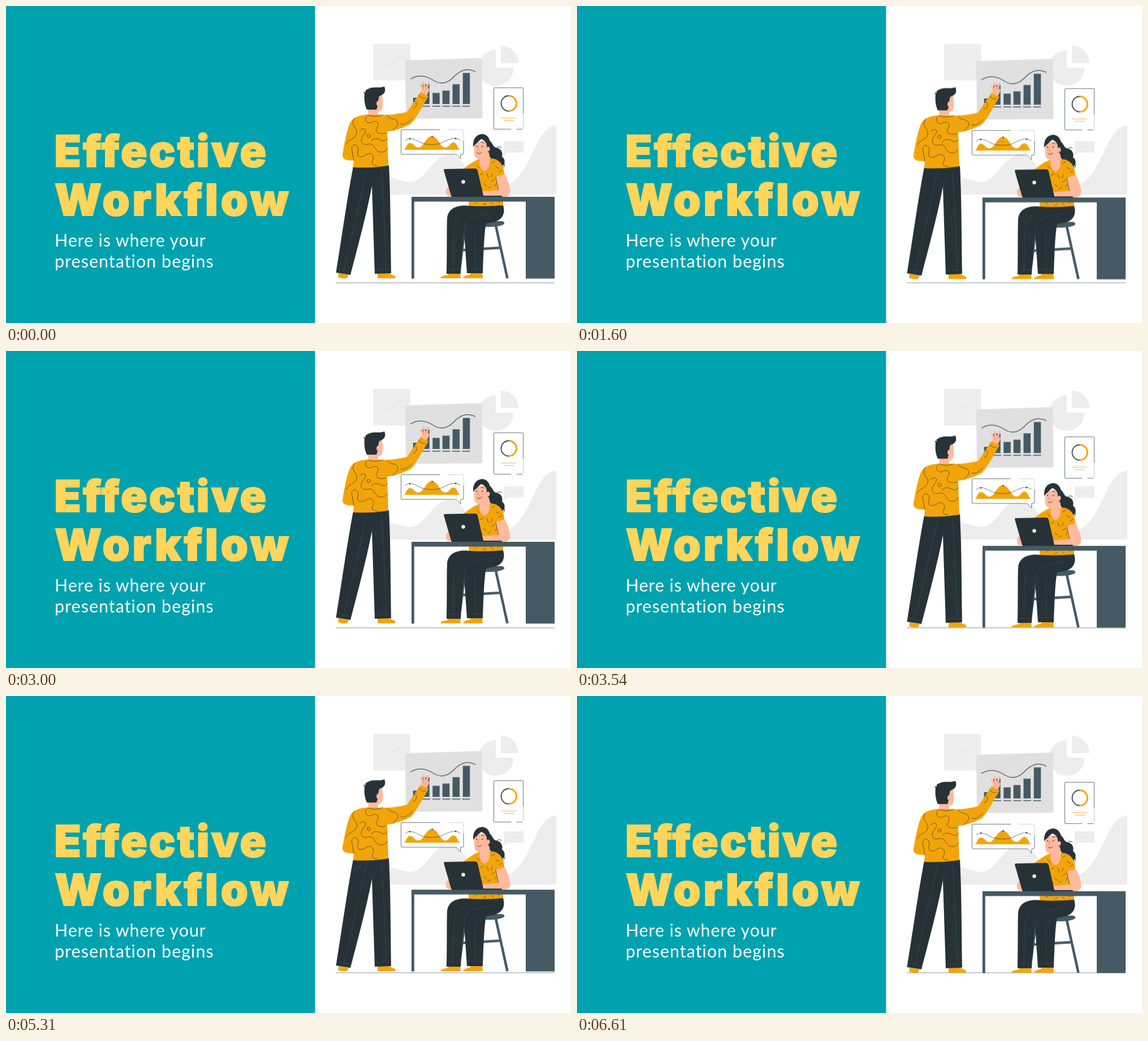
Write an HTML page without scripts that moves like this. It is 999x560 px and loops after 6690 ms.

```html
<!DOCTYPE html>
<html lang="en">
<head>
<meta charset="utf-8">
<title>Effective Workflow</title>
<style>
  html, body { margin: 0; width: 100%; height: 100%; overflow: hidden; background: #fff; }
  svg { display: block; width: 100vw; height: 100vh; }
  .title { font: 900 77px Inter, sans-serif; fill: #ffd55c; stroke: #ffd55c; stroke-width: 2; }
  .sub { font: 400 30.5px Lato, sans-serif; fill: #fff; }
  .pale { fill: #ededed; }
  .dark { fill: #263238; }
  .slate { fill: #455a64; }
  .gold { fill: #f2a50a; }
  .skin { fill: #ffb99c; }
  .line { fill: none; stroke: #263238; stroke-linecap: round; stroke-linejoin: round; }
  .thin { stroke-width: .9; opacity: .75; }
  .beam { fill: none; stroke: #455a64; }
  .crease { fill: none; stroke: #3f4d55; stroke-width: .7; }

  .float { animation: float 6.69s linear infinite; }
  @keyframes float {
    0% { transform: translateY(0); }
    8.97%, 31.39%, 53.81%, 76.23%, 98.65% { transform: translateY(8px); }
    20.18%, 42.6%, 65.02%, 87.44% { transform: translateY(-2px); }
    100% { transform: translateY(6.8px); }
  }
</style>
</head>
<body>
<svg viewBox="0 0 999 560" preserveAspectRatio="none">
  <rect width="999" height="560" fill="#fff"/>
  <rect width="546.5" height="560" fill="#00a2af"/>
  <text class="title" x="85.5" y="284" letter-spacing="3.3">Effective</text>
  <text class="title" x="86" y="370" letter-spacing="4.900">Workflow</text>
  <text class="sub" x="86" y="424.500" letter-spacing=".85">Here is where your</text>
  <text class="sub" x="86" y="461.500" letter-spacing="1">presentation begins</text>

  <!-- still backdrop -->
  <g class="pale">
    <path d="M679 303C698 306 712 316 728 307C748 294 758 263 785 263C812 263 815 305 845 317C930 345 925 214 973 211V333H679Z"/>
    <rect x="649" y="67" width="65.500" height="64.500" rx="2"/>
    <path d="M866 109V78A31.500 31.500 0 1 0 897.500 109Z"/>
    <path d="M875 101V70A31 31 0 0 1 906 101Z"/>
    <path d="M881 239H914Q915 239 915 240V258Q915 259 914 259H887L880 264V240Q880 239 881 239Z"/>
  </g>
  <path d="M665 112L675 102L679 106L686 96L690 98L700 83" fill="none" stroke="#dfdfdf"/>
  <path d="M889 249.500h2m5 0h2m5 0h2" stroke="#d9d9d9" stroke-width="2"/>
  <path d="M583 489H970" stroke="#8d9599"/>

  <g class="float">
    <!-- bar chart board -->
    <path d="M708 96L839 92Q841 92 841.500 94L842.500 196Q842.500 198 840 198.500L709 199Q707 199 707 197L706 98Q706 96 708 96Z" fill="#e0e0e0"/>
    <path class="beam" stroke-width="12.500" d="M726 173V162M742.500 173V138.500M760.500 173V153.500M778 173V149.500M795.800 173V138.300M814 173V118.300"/>
    <path class="beam" stroke-width="1.600" d="M719 177h14m3 0h14m4 0h14m3.500 0h14m3.500 0h14m3.500 0h14"/>
    <path class="beam" stroke-width="1.300" d="M715 129C733 119 746 125 757 132C769 139 780 137 791 126C804 112 816 109 830 116"/>

    <!-- ring card -->
    <rect x="862.500" y="144.500" width="52" height="73" rx="2" fill="#fff"/>
    <path class="line thin" d="M893 217.500H864Q862.500 217.500 862.500 216V146Q862.500 144.500 864 144.500H913Q914.500 144.500 914.500 146V190M903 217.500H913"/>
    <path d="M914.500 190V216" stroke="#c4c8ca"/>
    <path d="M889 158.500A13.500 13.500 0 0 0 889 185.500" fill="none" stroke="#37474f" stroke-width="1.800"/>
    <path d="M889 158.500A13.500 13.500 0 0 1 889 185.500" fill="none" stroke="#f2a50a" stroke-width="3"/>
    <path d="M875 198H902M880 202.500H898" stroke="#f4b63e" stroke-width="1.200"/>

    <!-- wave card -->
    <path d="M700 218.500H807Q809 218.500 809 221V260Q809 262 807 262H804L803.500 270L796 262H700Q698.500 262 698.500 260V220Q698.500 218.500 700 218.500Z" fill="#fff"/>
    <path class="line thin" d="M767 218.500H700Q698.500 218.500 698.500 220V260Q698.500 262 700 262H796L803.500 270L804 262H807Q809 262 809 260V238"/>
    <path d="M781 218.500H807Q809 218.500 809 221V238" fill="none" stroke="#cfd2d4"/>
    <path class="gold" d="M703 254C707 254 708 242 714 242C721 242 722 250 729 250C739 250 742 230 753 230C764 230 767 250 777 250C784 250 785 241 791 241C798 241 799 254 803 254Z"/>
    <path class="line thin" d="M706 238C713 230 723 236 733 241C743 246 762 246 772 241C784 235 794 230 803 237"/>
    <path class="line" stroke-width="2.400" d="M714 234.500h.1M753.500 230.500h.1M795 234h.1"/>

    <!-- standing man -->
    <path class="gold" d="M588 472L606 475L603 481Q594 482 587 479ZM657 471H675L688 477Q690 481 686 481H657Z"/>
    <path class="dark" d="M614 283L677 281C680 330 680 410 681 472L652 473L647 318C637 370 622 425 609 475L583.500 471C592 420 603 340 614 283Z"/>
    <path class="crease" d="M638 289C624 350 610 415 597 469M664 288C668 350 671 410 672 468M647 318Q648 307 656 302M618 296Q625 300 629 292M585 464L610 469M652 466L680 465"/>
    <path class="skin" d="M640 178H658V191Q654 198 641 193ZM655 158H665C667 168 667 178 664 183Q660 187 653 186Z"/>
    <path class="dark" d="M632 151L636 153Q634 149 639 147C649 141 659 146 669 142C673 151 668 157 660 159C658 164 658 171 657 177L655 183H638C634 175 633 164 634 155Z"/>
    <ellipse class="skin" cx="658.500" cy="172" rx="3.500" ry="4.500"/>
    <path class="skin" d="M733 154L735 147L732 140Q732 137 734 138L738 144L737 134Q738 131 740 134L742 143L746 134Q748 132 748.500 135L746 144Q750 146 748 150L743 160Z"/>
    <path d="M738 144L739 149M742 145Q746 144 748 147" fill="none" stroke="#d98468" stroke-width=".7"/>
    <path class="gold" d="M639 192C625 192 614 197 609 205C602 220 598 245 595 262C594 270 600 273 615 273L614 285Q645 287 676 282L674 222C690 220 708 213 716 208C722 203 735 180 747 159L733 152L709 187C695 190 680 193 667 192Z"/>
    <g class="line thin">
      <path d="M617 198C605 211 626 216 619 228C614 237 605 235 602 244"/>
      <path d="M638 194C631 204 641 209 648 205C656 201 661 207 656 215C651 223 660 228 672 224"/>
      <path d="M625 220C636 212 639 220 632 228C624 238 629 247 640 244C654 241 650 257 662 258C668 259 672 255 674 252"/>
      <path d="M615 273L611 250C616 239 626 248 622 258C619 267 630 268 636 263C646 256 653 266 648 274C646 279 650 283 656 282"/>
      <path d="M646 239C649 232 658 234 664 237C670 240 673 237 674 234"/>
      <path d="M674 193C679 202 688 197 692 204C696 211 687 215 684 220M698 208C704 212 713 204 718 199M720 181C727 178 728 171 723 168M730 157Q733 164 741 163"/>
      <circle cx="641" cy="229.500" r="3"/>
      <path d="M639 192Q652 198 666 192"/>
    </g>

    <!-- stool -->
    <path class="slate" d="M815 380H877Q882 381 881 385Q873 391 848 390Q820 389 815 385Z"/>
    <path class="beam" stroke-width="4.500" d="M866 388L886.500 481M812 386L803 458"/>
    <path class="beam" stroke-width="4.500" d="M808 431L875 427"/>

    <!-- seated woman -->
    <path class="dark" d="M852 236C861 240 860 248 866 250C876 252 879 259 877 266C885 272 882 283 874 285C867 286 862 281 861 274C853 266 848 250 852 236Z"/>
    <path class="line" d="M871 283Q881 290 882 279M866 253Q870 246 876 250"/>
    <path class="gold" d="M837 270C826 274 817 281 806 290L813 336H818V355H879V336L872 305L881 298C881 285 876 276 868 272C863 269 857 269 852 269Z"/>
    <path class="skin" d="M829 240C827 248 827 258 829 265Q832 271 838 270L837 276Q839 290 847 291Q856 287 855 270L855 238Z"/>
    <path class="dark" d="M826 249C825 235 831 227 842 226C852 227 857 235 856 247L855 262Q850 256 850 247C850 240 844 236 840 235C835 240 831 242 826 249Z"/>
    <ellipse class="skin" cx="852.500" cy="252.500" rx="3" ry="4"/>
    <circle cx="853" cy="259" r="1.200" class="gold"/>
    <g class="line">
      <path stroke-width=".9" d="M830 243L833 242M840 240L845 242M833 259Q837 263 841 258"/>
      <path stroke-width="2" d="M832 248h.1M842 248h.1"/>
    </g>
    <path d="M836 247L834 254H837" fill="none" stroke="#d47c62" stroke-width=".7"/>
    <path class="skin" d="M866 302L882 297C888 310 893 323 891 330C889 337 882 338 873 337L835 336Q831 332 838 328L871 325ZM787 324Q781 316 778 325Q777 333 782 336H791Z"/>
    <g class="line thin">
      <path d="M832 281l5 5M858 277l6-3M866 284l6 3M850 296l3 7M838 298l6-3M860 296l-2 6M872 293l5-3M845 314l5 4M858 310l6-4M864 318l3-4M842 323l-3-5M852 322l5-3M825 288l3 5M829 349l4-4M844 351l5-2M858 347l4 4M870 347l3-2"/>
      <path d="M866 302Q868 314 871 325"/>
    </g>
    <path class="dark" d="M776 288L829 287Q833 287 834 291L844 335Q844 337 842 338H791Q788 338 787 335L774 290Q774 288 776 288Z"/>
    <path class="dark" d="M790 335H875Q878 335 877 339H790Z"/>
    <circle cx="808.500" cy="310.500" r="3.200" fill="#fff"/>

    <path class="gold" d="M782 472H803L804 481H768Q768 477 782 475ZM821 471H842L843 481H808Q808 477 821 474Z"/>
    <path class="dark" d="M818 353Q848 355 879 352C884 368 876 380 859 382L849 384Q845 400 843 472H815L810 398Q806 437 804 473H779C780 430 779 399 780 375C782 356 800 351 818 353Z"/>
    <path class="crease" d="M790 468C792 430 789 395 796 379Q799 370 812 367M811 400C810 382 817 374 835 370L862 364M830 467L829 403Q829 391 839 387M780 465H804M816 464H843"/>

    <!-- desk -->
    <rect class="slate" x="717" y="337" width="253" height="8.500"/>
    <rect class="slate" x="717" y="337" width="4.800" height="144.500"/>
    <rect class="slate" x="919" y="345" width="51" height="136.500"/>
  </g>
</svg>
</body>
</html>
```
